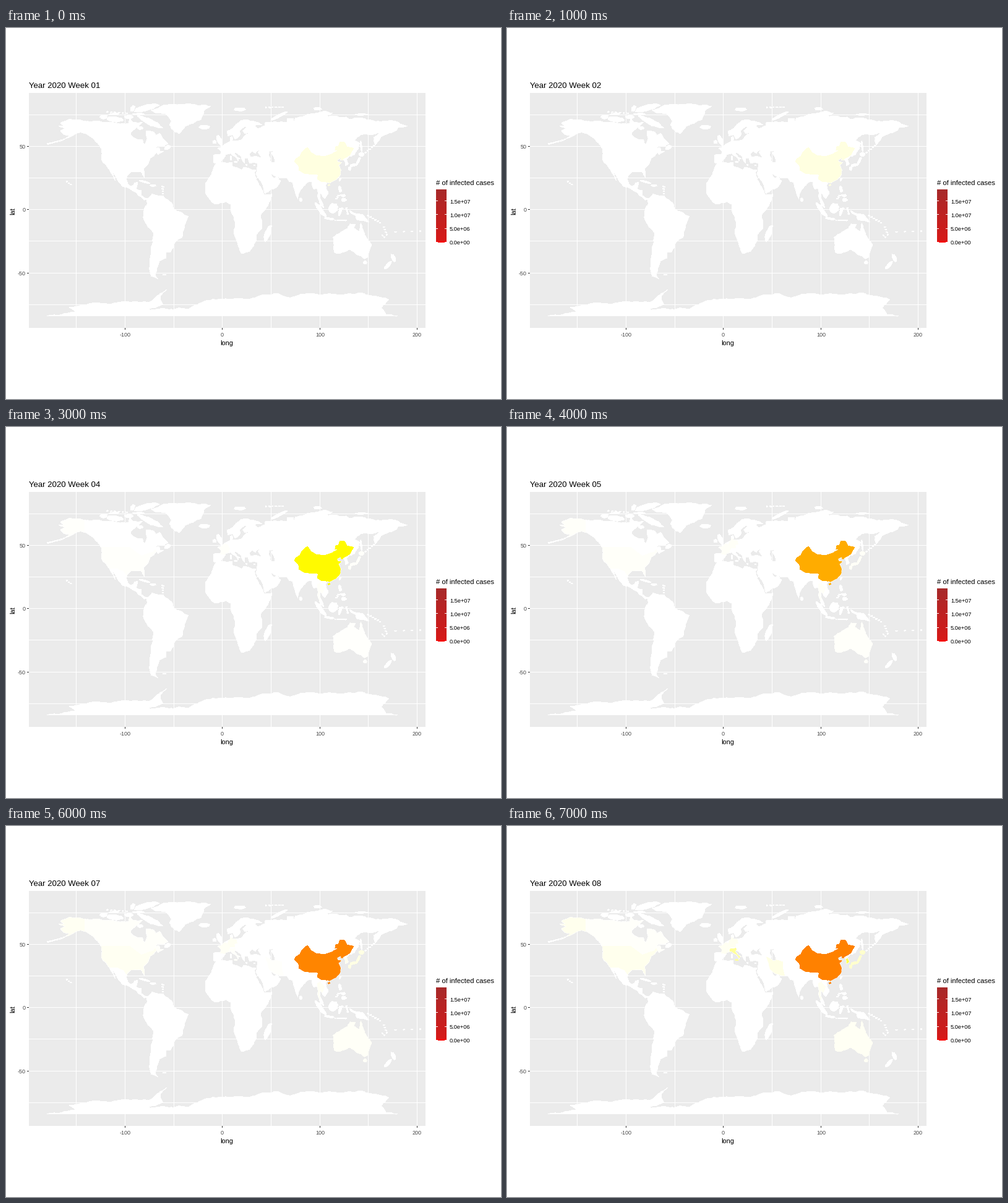
These frames come from a looping animation (800 by 600 pixels, 8000 ms). A matplotlib script:

```python
import numpy as np
import matplotlib.pyplot as plt
from matplotlib.animation import FuncAnimation
from matplotlib.patches import Polygon, Rectangle

plt.rcParams["font.family"] = "Liberation Sans"
PX = 0.72  # points per pixel at 100 dpi
rng = np.random.default_rng(4)

fig = plt.figure(figsize=(8, 6), dpi=100, facecolor="white")
ax = fig.add_axes([0, 0, 1, 1])
ax.axis("off")
regions = {}


def to_x(lon):
    return 349.4 + 1.5738 * lon


def to_y(lat):
    return 293.35 - 2.046 * lat


def to_px(coords):
    c = np.array(coords, float).reshape(-1, 2)
    return np.column_stack([to_x(c[:, 0]), to_y(c[:, 1])])


def box(x, y, w, h, color, z=1):
    ax.add_patch(Rectangle((x, y), w, h, fc=color, lw=0, antialiased=False, zorder=z))


def label(x, y, s, size, color="black", **kw):
    return ax.text(x, y, s, fontsize=size * PX, color=color, **kw)


# Map helpers
def fill(pts, name=None, clip=None):
    shape = Polygon(pts, closed=True, fc="white", lw=0, antialiased=False,
                    zorder=3 if name else 2)
    ax.add_patch(shape)
    if clip:
        shape.set_clip_path(clip)
    if name:
        regions.setdefault(name, []).append(shape)
    return shape


def ragged(a, b):
    """Points from a up to b, broken up by random midpoint shifts."""
    d = b - a
    size = np.hypot(*d)
    if not 4 < size < 300:
        return [a]
    shift = min(0.09, 1.5 / size) * rng.uniform(-1, 1)
    mid = (a + b) / 2 + shift * np.array([-d[1], d[0]])
    return ragged(a, mid) + ragged(mid, b)


def land(*coords, name=None):
    """Coast through lon, lat key points."""
    p = to_px(coords)
    return fill([q for a, b in zip(p, np.roll(p, -1, axis=0)) for q in ragged(a, b)], name)


def tint(name, base, *coords):
    """Coloured area, cut off at the coast of its base."""
    fill(to_px(coords), name, base)


def island(lon, lat, length, width, tilt=0, name=None):
    """Rough ellipse, sized in pixels."""
    t = np.linspace(0, 2 * np.pi, 18, endpoint=False)
    r = 0.5 * rng.uniform(0.85, 1.15, t.size)
    u, v, a = r * length * np.cos(t), r * width * np.sin(t), np.radians(tilt)
    fill(np.column_stack([to_x(lon) + u * np.cos(a) - v * np.sin(a),
                          to_y(lat) - u * np.sin(a) - v * np.cos(a)]), name)


def chain(n, lon0, lat0, lon1, lat1):
    """Small islands along a line."""
    for k in np.linspace(0, 1, n):
        island(lon0 + k * (lon1 - lon0), lat0 + k * (lat1 - lat0),
               rng.uniform(2, 3.5), 1.4, rng.uniform(-30, 30))


# Panel, grid and axes
box(37, 105, 641, 380, "#EBEBEB", 0)
for lat in range(-75, 76, 25):
    row = round(to_y(lat))
    box(37, row, 641, 1, "white")
    if lat % 50 == 0:
        box(34, row, 3, 1, "#333333")
        label(32, row + 4, str(lat), 9, "#4D4D4D", ha="right")
for lon in range(-150, 201, 50):
    col = round(to_x(lon))
    box(col, 105, 1, 380, "white")
    if lon % 100 == 0:
        box(col, 485, 1, 3, "#333333")
        label(col + 0.5, 499, str(lon), 9, "#4D4D4D", ha="center")
label(357, 513, "long", 11, ha="center")
label(11.5, 296, "lat", 11, rotation=90, ha="center", va="center")

# Legend
label(695, 254, "# of infected cases", 11.2)
steps = np.arange(86)
bar = np.column_stack([np.interp(steps, [0, 82, 85], ch) / 255
                       for ch in ([167, 215, 255], [42, 25, 0], [42, 24, 0])])
ax.imshow(bar[:, None, :], extent=(695, 712, 347, 261), aspect="auto",
          interpolation="nearest", zorder=1)
for k in range(4):
    y = int(346.5 - 22.4 * k)
    box(695, y, 3, 1, "white", 2)
    box(709, y, 3, 1, "white", 2)
    label(717, y + 4.5, f"{5e6 * k:.1e}", 9.1)

# Continents
north_america = land(
    -168, 66, -162, 66.3, -166, 68.3, -157, 71.3, -141, 69.8, -128, 70, -115, 68.8, -108, 68,
    -96, 68, -95, 72, -92, 69, -86, 68, -82, 69, -86, 66, -94, 61, -94, 59, -92, 57, -82, 55,
    -80, 51, -77, 56, -78, 62, -70, 61, -68, 58.5, -64, 60, -60, 55, -56, 52, -60, 50, -67, 50,
    -70, 47, -65, 49, -64, 46, -60, 46, -66, 43.5, -67, 45, -71, 42, -74, 40.5, -76, 36,
    -81, 32, -80, 25.5, -83, 29.5, -89, 30, -94, 29.5, -97.5, 27, -98, 22, -95, 18.3, -91, 19,
    -90, 21, -87, 21.5, -88, 16, -83, 15, -83.5, 11, -77, 8.5, -80, 7.5, -86, 11, -94, 16,
    -102, 18, -105.5, 21, -114, 31, -110, 23, -117, 32.5, -122, 37, -124, 40, -124, 48,
    -131, 55, -138, 59, -146, 61, -152, 59, -158, 56.5, -165, 54.5, -157, 58.5, -162, 59,
    -166, 62, -161, 64)
land(-77, 8.5, -72, 12, -62, 10.5, -51, 4, -50, 0, -35, -5.5, -39, -13, -41, -22, -48.5, -26,
     -53.5, -34, -58, -34, -58, -38.5, -65, -41, -67, -46, -69, -52, -66, -55, -73, -53,
     -75, -47, -73.5, -37, -70.3, -18.5, -76, -14, -81, -6, -80, 0.5, -77, 4)
land(-73, 78.3, -61, 82, -33, 83.5, -12, 81.5, -19, 78, -22, 71, -38, 66, -44, 60, -49, 61.5,
     -54, 67, -52, 70, -58, 75.5, -68, 76)
land(-6, 36, 10, 37, 10.5, 34, 20, 31, 22, 33, 32, 31, 34.5, 31, 33, 29, 37, 21, 43, 11.5,
     51, 12, 47, 3, 39, -5, 40.5, -15, 35, -20, 35, -24.5, 28, -33, 20, -35, 18, -32, 12, -18,
     13.5, -11, 9, -1, 9, 4.2, 4, 6.3, -8, 4.4, -13, 8.5, -17.4, 14.7, -17, 21, -10, 30)
land(32, 69.8, 25, 71, 19, 70, 11, 64, 5, 62, 6, 58, 10.5, 59, 13, 55.5, 16.5, 57, 18.5, 60,
     17.5, 62, 23, 65.8, 25, 65, 21.3, 62, 23, 60, 30, 60, 32, 62)
land(31, 69.8, 41, 67, 33, 66.6, 36, 64, 40, 64.7, 44, 66, 44, 68.5, 63, 69, 63, 48, 53, 46.8,
     48, 46, 47.5, 43, 49.5, 40, 48, 38, 41.5, 41, 37, 45, 39, 47, 35, 46, 34, 44.4, 30.5, 46.5,
     27, 50, 27, 59.5)
west = land(29, 60, 24, 59, 22, 57, 20, 55, 14, 54, 10.5, 54, 10.5, 57.5, 8, 57, 8.5, 54, 4, 52,
            1.5, 50.8, -2, 48.7, -4.7, 48.3, -1.3, 46, -1.7, 43.4, -9, 43, -9, 37, -5.5, 36,
            -2, 37, 0, 39, 3, 42, 3.5, 43.3, 8.5, 44.3, 10.5, 43, 15.5, 40, 16, 38, 17, 40,
            18.4, 40, 12.5, 44, 13.5, 45.6, 19.5, 42, 21, 38.5, 23, 36.5, 23, 40.3, 29, 41,
            28, 44, 31, 46.5)
land(26.5, 40, 29, 41.2, 35, 42, 48, 41, 49, 38.5, 47, 32, 50, 27, 54, 24, 56, 26, 60, 22.5,
     55, 17, 44, 12.7, 42.5, 17, 35, 28.5, 36, 36.5, 28, 36.7)
land(58, 69, 67, 69, 67, 72, 73, 72, 73, 67, 75, 72, 81, 73, 87, 75, 104, 77.5, 113, 76,
     107, 73.5, 127, 73, 131, 71, 140, 72.5, 160, 69.7, 176, 70, 190, 66, 180, 64.5, 179, 62.5,
     170, 60, 163, 57.5, 157, 51, 156, 57, 163, 62, 155, 59.3, 142, 59, 135, 54.5, 141, 52,
     140, 48, 130, 45, 60, 48, 58, 50)
asia = land(60, 55, 135, 54, 140, 48, 135, 43, 130, 42, 127.5, 39.5, 129.5, 36, 126.5, 34.5,
            126.5, 37, 125, 39, 121.5, 39, 122, 40.5, 118, 39, 119, 37.3, 122.4, 37, 119.5, 35,
            121.8, 31, 121.5, 28, 117, 23.5, 110, 20.8, 108, 21.6, 106, 19, 109, 13, 105, 8.7,
            102, 12, 100, 13.5, 99.5, 9.5, 103.5, 4, 104, 1.4, 101, 3, 98.3, 9, 97.5, 16.5,
            94.5, 16, 92, 22, 87, 21.5, 80, 15, 77.5, 8, 73, 18, 72.5, 21.5, 69, 22, 66.5, 25,
            57, 26, 54, 26.5, 48, 30.3, 46, 36, 44, 40, 49, 38.5, 51, 36.7, 54, 37, 53, 42,
            51, 44.5, 53, 47)
land(131, -1, 135, -3, 144, -4, 150.5, -10, 143, -9, 138, -8, 137, -5, 132, -3)
land(114, -22, 115.5, -34, 118, -35, 131, -31.5, 138, -35.5, 146, -39, 150, -37.5, 153.5, -28,
     146, -19, 142.5, -11, 140.5, -17.5, 135.5, -15, 136.5, -12, 131.5, -11.5, 129, -15,
     122, -18, name="australia")
land(-180, -84.3, -150, -81, -157, -77.5, -135, -74.5, -75, -73.5, -66, -68, -57, -63.3,
     -64, -69, -61, -75, -78, -79, -35, -79, -15, -72, 35, -69.5, 56, -66.5, 70, -70, 85, -67,
     140, -66, 171, -71.5, 163, -78, 168, -83, 180, -84.3)

# Arctic islands
island(-110, 71.2, 25, 8, -5)
island(-74, 69, 42, 9, -25)
island(-78, 80.3, 40, 9, 15)
island(-86, 75.3, 18, 3)
island(-121.5, 73, 12, 6)
island(-111, 75.4, 17, 3, 5)
island(-96, 73, 14, 5)
island(-92, 79.7, 10, 6, 60)
island(-84, 64.3, 9, 5)
island(-18.5, 65, 17, 6)
island(18, 79, 18, 5)
island(58, 73.7, 28, 4, 27)
island(98, 79.5, 12, 4)
island(143, 75, 18, 2.5)
chain(6, -118, 77, -98, 76)
chain(6, 45, 80.6, 62, 80.8)

# Atlantic and Mediterranean
island(-2.5, 54.3, 17, 7, 115)
island(-8, 53.3, 6, 5)
island(-56, 49, 10, 6, 30)
island(-79.5, 21.7, 17, 2.5, -15)
island(-71, 18.9, 9, 3)
island(9, 40.7, 7, 2, 90)
island(-59, -51.7, 5, 1.5)
island(14, 37.5, 5, 2, name="italy")
chain(2, 25, 35.2, 33, 35)
chain(5, -61, 18, -61, 10.5)

# Indian Ocean and Southeast Asia
island(46.8, -19, 27, 8, 70)
island(80.7, 7.6, 6, 4, 90)
island(101, -0.5, 28, 6, -54)
island(110, -7.3, 15, 3, -8)
island(114, 1, 17, 13, 50)
island(121, -2, 13, 4, 70)
island(122.5, 0.8, 7, 1.5)
island(121, 16, 10, 4, 100)
island(124, 11, 7, 4)
island(125, 7.5, 8, 5)
chain(6, 116, -8.5, 127, -8.7)
chain(4, 127.5, 1, 129, -3.5)
chain(3, 117.5, 8.5, 119.5, 11)

# East Asia and Pacific
island(109.8, 19.2, 3, 2, name="china")
island(121, 23.7, 6, 2, 65)
island(142.7, 50, 17, 2.5, 95)
for spot in ((135, 35, 12, 4, 12), (139.8, 38.3, 14, 3.5, 65), (143, 43.4, 8, 6, 0),
             (131, 32.3, 6, 4, 80)):
    island(*spot, name="japan")
island(146.7, -42, 6, 5, name="australia")
island(175.8, -38.5, 13, 6, -70)
island(170.5, -43.8, 15, 5, 47)
chain(6, 145, 43.5, 156, 50.5)
chain(8, -165, 54.5, -179, 51.8)
chain(3, -155.5, 19.6, -159.5, 22)
chain(6, 150, -5, 162, -10.5)
chain(4, 166, -14, 169, -20)
chain(2, 164.5, -20.5, 166.5, -22)
chain(5, 178, -17.8, 212, -17)

# Countries
tint("usa", north_america, -130, 49, -95, 49, -83, 42, -76, 44, -71, 45, -69, 47.5, -67, 45,
     -65, 40, -75, 24, -97, 25, -101, 29.5, -107, 31.5, -117, 32, -130, 33)
tint("usa", north_america, -141, 73, -141, 60, -130, 55, -170, 53, -170, 73)
tint("canada", north_america, -141, 73, -141, 60, -130, 55, -130, 49, -95, 49, -83, 42, -76, 44,
     -71, 45, -69, 47.5, -67, 45, -64, 42, -50, 47, -50, 62, -80, 73)
tint("france", west, -5, 50, 2, 51.5, 8, 49, 7, 43, 3, 42.5, -2, 43)
tint("germany", west, 6, 51, 8, 55, 14, 54.5, 15, 51, 12, 50, 13, 48, 8, 47.6)
tint("italy", west, 7, 44, 7, 46, 13, 46.7, 13.5, 45, 19, 40, 16, 37.5, 9, 43.5)
tint("iran", asia, 44, 40, 49, 38, 54, 37.5, 61, 36, 61, 31, 63, 25, 52, 24, 46, 33)
tint("thailand", asia, 98, 19, 100.5, 20, 105, 16, 102.5, 12, 100, 6, 98, 8)
tint("korea", asia, 125, 37.8, 128.5, 38.6, 131, 37, 130, 34, 125, 34)
tint("china", asia, 75, 39.5, 80, 42, 82, 45.3, 87.5, 49, 91, 45, 96, 42.7, 105, 41.7,
     112, 43.5, 119.5, 46.7, 116, 46.7, 116.5, 49.5, 119.5, 50, 121, 53.3, 125.5, 53,
     128, 49.5, 134.7, 48.3, 131, 43, 124.3, 40, 124, 37, 123, 30, 115, 20, 108, 20.5,
     108, 21.6, 102, 22, 98, 24, 98.5, 27.5, 92, 27.8, 85, 28.3, 79, 31, 78.5, 34.5, 74.5, 37.5)

# Depth of yellow in the last week, share kept per week back, first week
GROWTH = {
    "usa": (18, 0.7, 3), "canada": (5, 1, 5), "australia": (11, 0.75, 3),
    "germany": (15, 0.8, 4), "france": (13, 0.8, 3), "italy": (100, 0.05, 4),
    "iran": (25, 0.15, 6), "korea": (175, 0.11, 3), "japan": (50, 0.55, 2),
    "thailand": (14, 0.8, 2),
}


def color_of(name, week):
    """Light yellow deepens to yellow; one country then settles towards orange."""
    green, blue = 255, 255
    if name != "china":
        depth, share, first = GROWTH[name]
        if week >= first:
            blue -= depth * share ** (7 - week)
    elif week < 3:
        blue = 224 - 69 * max(week - 1, 0)
    else:
        green, blue = 127 + 123 * np.exp(3 - week), 0
    return 1, green / 255, blue / 255


title = label(37, 97, "", 13.2)
ax.set_xlim(0, 800)
ax.set_ylim(600, 0)


def draw(week):
    title.set_text(f"Year 2020 Week {week + 1:02d}")
    for name, shapes in regions.items():
        for shape in shapes:
            shape.set_facecolor(color_of(name, week))
    return [title]


anim = FuncAnimation(fig, draw, frames=8, interval=1000, repeat=True, repeat_delay=0)
plt.show()
```
